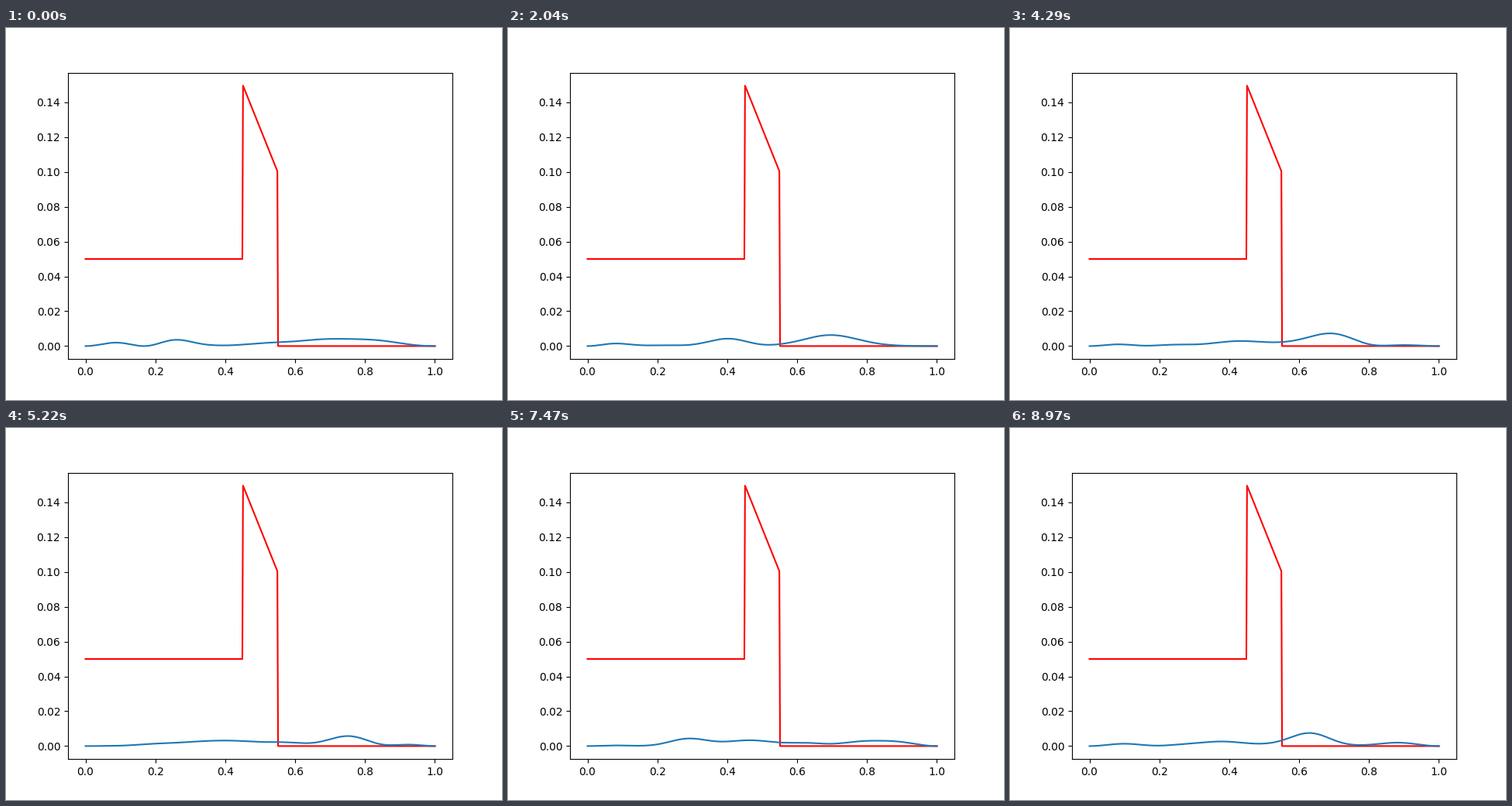
A matplotlib script that plays this animation: 640x480 px, repeating every 9 s.

```python
import numpy as np
import matplotlib.pyplot as plt
from matplotlib.animation import FuncAnimation

N, FRAMES, INTERVAL = 500, 300, 30
PERIOD = 110  # steps per turn of the lowest mode's phase

x = np.linspace(0, 1, N)

# Wave in a box: sine modes whose phases turn at rates growing with n squared.
weights = 0.01 * np.array([5.12, -2.22, 0.8, -1.19, -1.52,
                           -1.71, -1.06, -0.28, 0.2, 0.25])
n = np.arange(1, len(weights) + 1)
modes = np.sin(np.pi * np.outer(n, x))
rates = 2 * np.pi * n**2 / PERIOD


def density(step):
    psi = (weights * np.exp(-1j * rates * step)) @ modes
    return np.abs(psi) ** 2


# Step on the left, sloping barrier in the middle, nothing on the right.
potential = np.select([x < 0.45, x < 0.55], [0.05, 0.15 - 0.5 * (x - 0.45)], 0)

fig, ax = plt.subplots(figsize=(6.4, 4.8), dpi=100)
ax.plot(x, potential, color="red")
wave, = ax.plot(x, density(0), color="tab:blue")


def update(step):
    wave.set_ydata(density(step))
    return wave,


anim = FuncAnimation(fig, update, frames=FRAMES, interval=INTERVAL,
                     repeat=True, repeat_delay=0)
plt.show()
```
